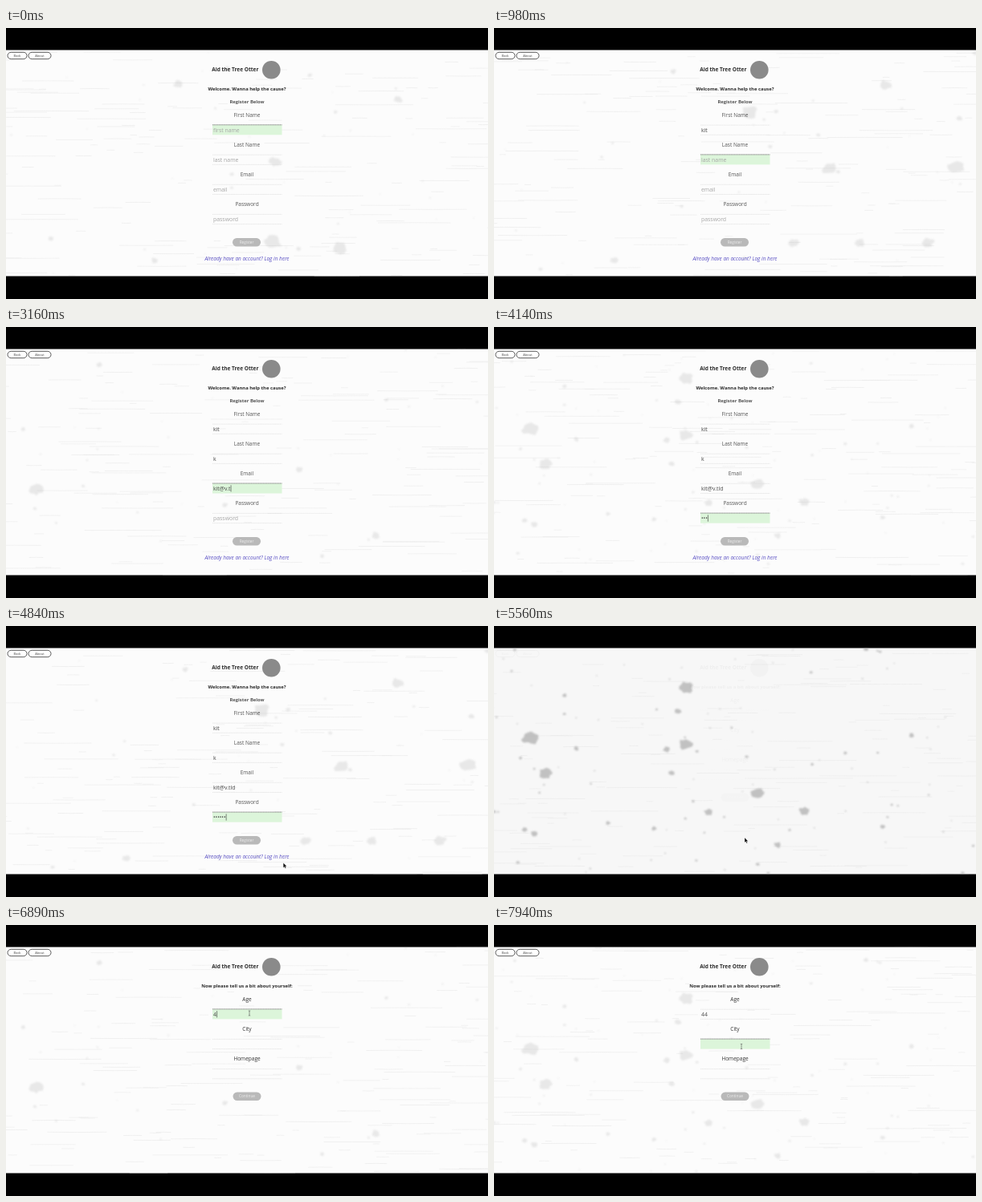
Animation of 600 by 338 pixels, one loop 8000 ms. Source, as an HTML page:

```html
<!DOCTYPE html>
<html lang="en">
<head>
<meta charset="utf-8">
<title>Sign-up form</title>
<style>
html, body { margin: 0; width: 100%; height: 100%; overflow: hidden; background: #000; }
svg { display: block; width: 100vw; height: 100vh; }
text { font-family: "Open Sans", "Noto Sans", sans-serif; text-anchor: middle; fill: #555; }
.label { font-size: 6.5px; }
.dark .label { fill: #333; }
.head { font-size: 5.87px; font-weight: 700; fill: #2a2a2a; }
.name { font-size: 6.5px; }
.sub { fill: #555; }
.link { font-size: 6.45px; font-style: italic; fill: #5a50c4; }
.input { font-size: 6.9px; text-anchor: start; fill: #4a4a4a; }
.hint { fill: #a6a6a6; }
.small { font-size: 4px; fill: #444; }
.submit { font-size: 4.7px; fill: #ededed; }
</style>
</head>
<body>
<svg id="stage" viewBox="0 0 600 338" preserveAspectRatio="none">
  <defs>
    <clipPath id="paper"><rect y="27.5" width="600" height="282"/></clipPath>
    <filter id="soft"><feGaussianBlur stdDeviation="0.8"/></filter>
  </defs>
  <rect width="600" height="338"/>
  <g clip-path="url(#paper)">
    <rect id="sheet" y="27" width="600" height="283"/>
    <path id="grain" fill="none" stroke="#e9e9e9" stroke-width="0.6"/>
    <g id="spots" fill="#aaa" filter="url(#soft)"></g>
    <g id="ui"></g>
  </g>
  <path id="arrow" d="M0 0v6l1.4-1.3 1 2.2 1-.5-1-2h1.9z" stroke="#fff" stroke-width="0.3"/>
  <path id="beam" d="M-1.2-3.2Q0-3.2 0-2.5Q0-3.2 1.2-3.2M0-2.7V2.7M-1.2 3.2Q0 3.2 0 2.5Q0 3.2 1.2 3.2" fill="none" stroke="#555" stroke-width="0.6"/>
</svg>
<script>
const LOOP = 8000, STEP = 70, SWITCH = 5560;
const $ = id => document.getElementById(id);
const clamp = v => Math.max(0, Math.min(1, v));

function add(parent, tag, attrs = {}, text) {
  const el = document.createElementNS("http://www.w3.org/2000/svg", tag);
  for (const k in attrs) el.setAttribute(k, attrs[k]);
  if (text !== undefined) el.textContent = text;
  parent.appendChild(el);
  return el;
}
const label = (p, x, y, text, cls) => add(p, "text", { x, y, class: cls }, text);
const show = (el, on) => { el.style.display = on ? "" : "none"; };

function random(seed) {
  let s = seed * 7919 + 17;
  return () => {
    s = (s + 0x6D2B79F5) | 0;
    let r = Math.imul(s ^ (s >>> 15), 1 | s);
    r = (r + Math.imul(r ^ (r >>> 7), 61 | r)) ^ r;
    return ((r ^ (r >>> 14)) >>> 0) / 4294967296;
  };
}

// Paper blemishes: a few sheets that alternate, each with x, y, radius
const sheets = [
  [[331, 267, 11], [415, 274, 9], [335, 167, 7], [214, 70, 5], [488, 89, 5], [185, 290, 4]],
  [[239, 77, 8], [238, 147, 8], [45, 140, 9], [64, 184, 7], [328, 208, 7], [386, 231, 6],
   [267, 232, 5], [215, 154, 4], [229, 106, 4], [353, 273, 4], [50, 259, 4], [38, 254, 3]],
  [[37, 203, 8], [365, 178, 4], [460, 260, 5]],
  [[428, 130, 9], [510, 117, 7], [365, 43, 6], [95, 268, 6], [42, 298, 8], [415, 270, 6]],
  [[318, 105, 9], [418, 175, 9], [487, 71, 7], [575, 173, 9], [540, 267, 7], [373, 268, 6],
   [455, 268, 6], [150, 290, 5]]
].map((list, i) => {
  const rnd = random(i + 1), g = add($("spots"), "g");
  let d = "";
  const blob = (x, y, r) => {
    for (let k = 0; k < 13; k++) {
      const a = k / 13 * Math.PI * 2, q = r * (0.68 + 0.5 * rnd());
      d += (k ? "L" : "M") + (x + q * 1.12 * Math.cos(a)).toFixed(1) + " " + (y + q * 0.88 * Math.sin(a)).toFixed(1);
    }
    d += "Z";
  };
  list.forEach(s => blob(...s));
  const few = i === 1 ? 95 : 35;
  for (let k = 0; k < few; k++) blob(rnd() * 600, 28 + rnd() * 282, 0.8 + 2.6 * rnd() ** 3);
  add(g, "path", { d });
  return g;
});
const sheetAt = k => k < 3 ? 0 : k < 8 ? 1 : k < 12 ? 2 : k < 14 ? 3 : 4;

function drawGrain(n) {
  const rnd = random(n + 100);
  let d = "";
  for (let i = 0; i < 150; i++) {
    const x = rnd() * 640 - 40, y = 28 + rnd() * 282, w = 8 + 90 * rnd() ** 2;
    d += `M${x.toFixed(1)} ${y.toFixed(1)}q${(w / 2).toFixed(1)} ${(rnd() - 0.5).toFixed(1)} ${w.toFixed(1)} 0`;
  }
  $("grain").setAttribute("d", d);
}

// Shared page frame
function page(cls) {
  const g = add($("ui"), "g", { class: cls });
  [[2, 24, "Back"], [28, 28, "About"]].forEach(([x, w, s]) => {
    add(g, "rect", { x, y: 30.3, width: w, height: 8.4, rx: 4.2, fill: "#fff", stroke: "#333", "stroke-width": 0.8 });
    label(g, x + w / 2, 36, s, "small");
  });
  label(g, 285.3, 54.2, "Aid the Tree Otter", "head name");
  add(g, "circle", { cx: 330.3, cy: 52.2, r: 11.3, fill: "#8a8a8a" });
  return g;
}

function button(g, x, y, text) {
  add(g, "rect", { x, y, width: 35, height: 10.4, rx: 5.2, fill: "#b9b9b9" });
  label(g, x + 17.5, y + 6.8, text, "submit");
}

// keys: time of each keystroke; from/to: time span of the focus
function field(g, y, title, hint, text, keys, from, to) {
  label(g, 300, y - 10.3, title, "label");
  const fill = add(g, "rect", { x: 257, y, width: 86.5, height: 12.5, fill: "#dcf5da" });
  const lines = add(g, "path", { d: `M257 ${y + .3}h86.5M257 ${y + 12.5}h86.5`, stroke: "#dadada", "stroke-width": 0.6, "stroke-dasharray": "1.4 .5" });
  const edge = add(g, "path", { d: `M257 ${y}h86.5`, stroke: "#8c8c8c", "stroke-width": 1, "stroke-dasharray": "1.5 .4" });
  const value = label(g, 258, y + 8.8, "", "input");
  const caret = add(g, "path", { stroke: "#333", "stroke-width": 0.6 });
  return t => {
    const focus = t >= from && t < to;
    const typed = text.slice(0, keys.filter(k => k <= t).length);
    value.textContent = typed || hint;
    value.setAttribute("class", typed ? "input" : "input hint");
    [fill, edge].forEach(el => show(el, focus));
    show(lines, !focus);
    show(caret, focus && typed);
    if (focus && typed)
      caret.setAttribute("d", `M${258.6 + value.getComputedTextLength()} ${y + 2.3}v8.2`);
  };
}

const first = page("");
label(first, 300, 78.3, "Welcome. Wanna help the cause?", "head");
label(first, 300, 94.2, "Register Below", "head sub");
const fields = [
  field(first, 120.8, "First Name", "first name", "kit", [280, 420, 560], 0, 840),
  field(first, 157.9, "Last Name", "last name", "k", [1260], 840, 1540),
  field(first, 195, "Email", "email", "kit@v.tld", [1750, 1900, 2040, 2460, 2740, 2950, 3090, 3230, 3370], 1540, 3580),
  field(first, 232.1, "Password", "password", "••••••", [3860, 4000, 4130, 4350, 4490, 4630], 3580, SWITCH)
];
button(first, 282, 262, "Register");
label(first, 300, 290, "Already have an account? Log in here", "link");

const second = page("dark");
label(second, 300, 78.3, "Now please tell us a bit about yourself:", "head");
fields.push(
  field(second, 104.9, "Age", "", "44", [6850, 7170], 6540, 7450),
  field(second, 142.1, "City", "", "", [], 7450, LOOP),
  field(second, 179.3, "Homepage", "", "", [], LOOP, LOOP)
);
button(second, 282.5, 208.6, "Continue");

// Pointer path: time, x, y
const path = [[4760, 350, 300], [5120, 312, 264], [5900, 312, 264], [6470, 303, 110], [7200, 303, 110], [7420, 308, 151.5], [LOOP, 308, 151.5]];
function pointer(t) {
  const i = Math.max(1, path.findIndex(p => p[0] >= t));
  const [a, b] = [path[i - 1], path[i]];
  const u = clamp((t - a[0]) / (b[0] - a[0])), e = u * u * (3 - 2 * u);
  return [a[1] + (b[1] - a[1]) * e, a[2] + (b[2] - a[2]) * e];
}

// Picture steps, with two short holds
function snap(t) {
  const [start, last] = t < 1830 ? [0, 1680] : t < SWITCH ? [1830, 5260] : [SWITCH, 7940];
  return Math.min(last, start + Math.floor((t - start) / STEP) * STEP);
}

let shown = -1;
function render(t) {
  t = snap(t);
  if (t === shown) return;
  shown = t;
  const n = Math.floor(t / STEP), pick = sheetAt(n % 18);
  const fade = t < SWITCH ? 1 : clamp((t - SWITCH) / 560);
  drawGrain(n);
  sheets.forEach((g, i) => show(g, i === pick));
  const drift = pick === 1 ? 15 * Math.sin((t - SWITCH) / 1400) : 0;
  $("spots").setAttribute("transform", `translate(0 ${drift.toFixed(1)})`);
  $("spots").setAttribute("opacity", 0.7 - 0.47 * fade);
  const tone = Math.round(247 + 5 * fade);
  $("sheet").setAttribute("fill", `rgb(${tone},${tone},${tone})`);

  show(first, t < SWITCH);
  show(second, t >= SWITCH);
  second.setAttribute("opacity", 0.04 + 0.96 * fade);
  fields.forEach(f => f(t));

  const [x, y] = pointer(t);
  const inField = t > 6400;
  show($("arrow"), t >= 4760 && !inField);
  show($("beam"), inField);
  $(inField ? "beam" : "arrow").setAttribute("transform", `translate(${x} ${y})`);
}

const begin = performance.now();
function tick(now) {
  render(Math.max(0, now - begin) % LOOP);
  requestAnimationFrame(tick);
}
render(0);
requestAnimationFrame(tick);
</script>
</body>
</html>
```
